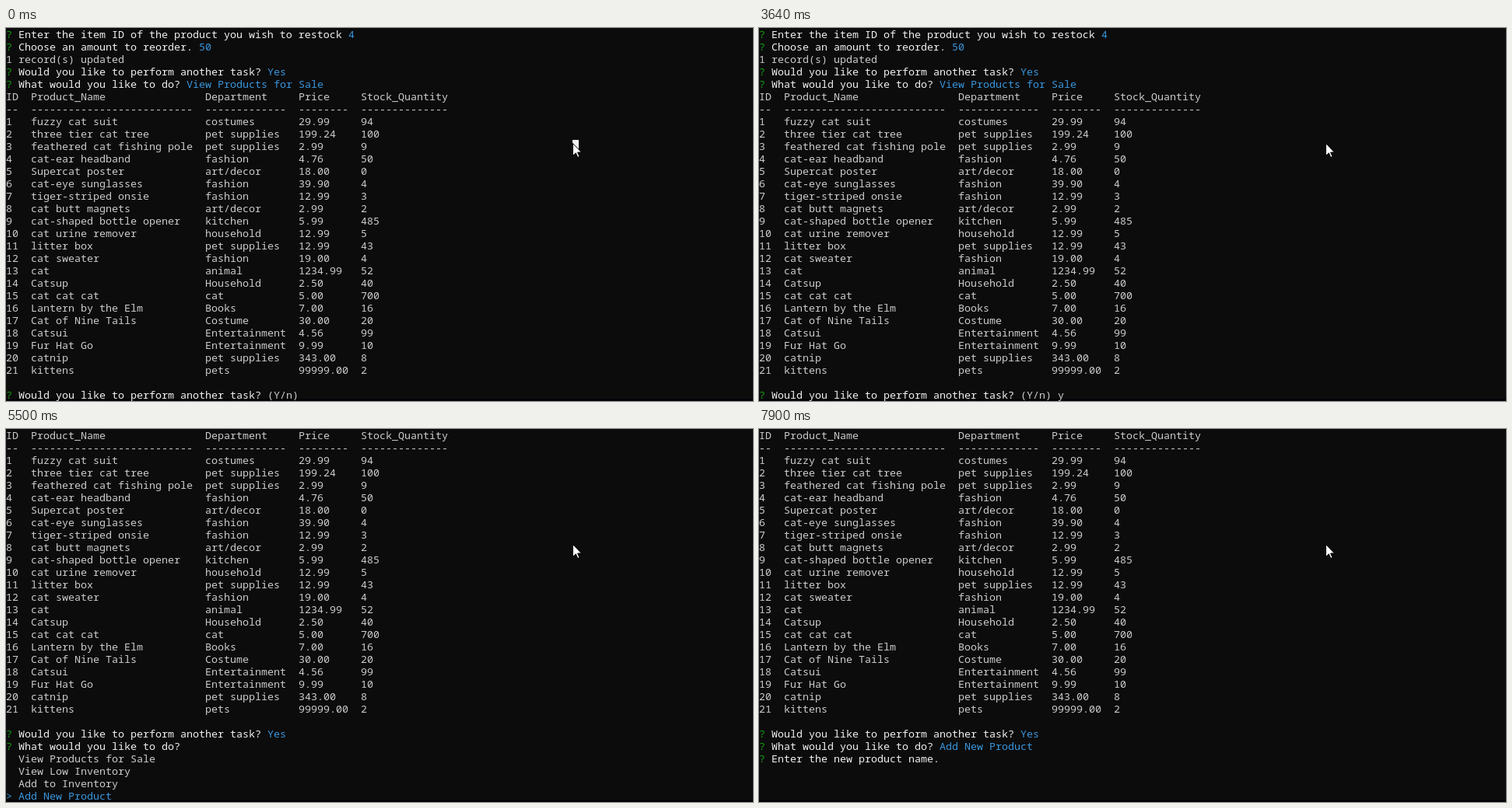
Recreate the animation shown at these times as an HTML page. Size 960 by 480 pixels, loop 8 s.

```html
<!DOCTYPE html>
<html lang="en">
<head>
<meta charset="utf-8">
<title>Inventory terminal</title>
<style>
  html, body { margin: 0; width: 100%; height: 100%; overflow: hidden; background: #0c0c0c; }
  svg { display: block; width: 960px; height: 480px; }
  text { font: 13.3333px "Noto Sans Mono", "DejaVu Sans Mono", monospace; white-space: pre; fill: #ccc; }
  .ask { fill: #f2f2f2; }
  .mark { fill: #13a10e; }
  .pick { fill: #3a96dd; }
  .block { fill: #f3f3f3; }
</style>
</head>
<body>
<svg viewBox="0 0 960 480">
  <rect width="960" height="480" fill="#0c0c0c"/>
  <rect y="477" width="960" height="3" fill="#050208"/>
  <g id="screen"></g>
  <rect id="selection" class="block" x="728" y="144" width="8" height="16"/>
  <rect id="caret" class="block" width="8" height="4"/>
  <path transform="translate(728 148)" d="M.5 .5V16.5L4.3 12.8L6.8 18.5L9 17.5L6.6 12H11.5Z" fill="#fff" stroke="#000"/>
</svg>
<script>
const CELL = 8, LINE = 16, BASELINE = 13, LOOP = 8000;
const COLUMNS = [0, 4, 32, 47, 57];
const WIDTHS = [2, 26, 13, 8, 14];

const PRODUCTS = `fuzzy cat suit|costumes|29.99|94
three tier cat tree|pet supplies|199.24|100
feathered cat fishing pole|pet supplies|2.99|9
cat-ear headband|fashion|4.76|50
Supercat poster|art/decor|18.00|0
cat-eye sunglasses|fashion|39.90|4
tiger-striped onsie|fashion|12.99|3
cat butt magnets|art/decor|2.99|2
cat-shaped bottle opener|kitchen|5.99|485
cat urine remover|household|12.99|5
litter box|pet supplies|12.99|43
cat sweater|fashion|19.00|4
cat|animal|1234.99|52
Catsup|Household|2.50|40
cat cat cat|cat|5.00|700
Lantern by the Elm|Books|7.00|16
Cat of Nine Tails|Costume|30.00|20
Catsui|Entertainment|4.56|99
Fur Hat Go|Entertainment|9.99|10
catnip|pet supplies|343.00|8
kittens|pets|99999.00|2`.split("\n").map((row, i) => [String(i + 1), ...row.split("|")]);

const MENU = ["View Products for Sale", "View Low Inventory", "Add to Inventory", "Add New Product"];
const AGAIN = "Would you like to perform another task?";
const WHAT = "What would you like to do?";

const put = (row, col, str, cls = "") =>
  `<text class="${cls}" x="${col * CELL}" y="${row * LINE + BASELINE}">${str.replace(/>/g, "&gt;")}</text>`;

const ask = (row, question, answer = "", cls = "pick") =>
  put(row, 0, "?", "mark") + put(row, 2, question, "ask") +
  (answer && put(row, question.length + 3, answer, cls));

const table = top => [
  ["ID", "Product_Name", "Department", "Price", "Stock_Quantity"],
  WIDTHS.map(n => "-".repeat(n)),
  ...PRODUCTS
].map((cells, i) => cells.map((s, c) => put(top + i, COLUMNS[c], s)).join("")).join("");

const listing = reply =>
  ask(0, "Enter the item ID of the product you wish to restock", "4") +
  ask(1, "Choose an amount to reorder.", "50") +
  put(2, 0, "1 record(s) updated") +
  ask(3, AGAIN, "Yes") +
  ask(4, WHAT, MENU[0]) +
  table(5) +
  ask(29, AGAIN, "(Y/n)" + reply, "");

const scrolled = () => table(0) + ask(24, AGAIN, "Yes");

const menu = (active, hint = "") =>
  scrolled() + ask(25, WHAT, hint, "") +
  MENU.map((item, i) => i === active
    ? put(26 + i, 0, "> " + item, "pick")
    : put(26 + i, 2, item)).join("");

const naming = () =>
  scrolled() + ask(25, WHAT, MENU[3]) + ask(26, "Enter the new product name.");

// start time, screen contents
const SCREENS = [
  [0, listing("")],
  [2440, listing(" y")],
  [3840, menu(0, "(Use arrow keys)")],
  [5100, menu(1)],
  [5300, menu(2)],
  [5500, menu(3)],
  [6370, naming()]
];

// on, off, column, row
const CARETS = [
  [500, 1040, 48, 29], [1570, 2100, 48, 29],
  [2440, 2640, 49, 29], [3100, 3640, 49, 29],
  [6370, 6840, 30, 26], [7370, 7900, 30, 26]
];

const [screenEl, selection, caret] =
  ["screen", "selection", "caret"].map(id => document.getElementById(id));
const show = (el, on) => el.setAttribute("visibility", on ? "visible" : "hidden");
let shown = null;

function draw(now) {
  const t = now % LOOP;
  const current = SCREENS.filter(([start]) => start <= t).pop();
  if (current !== shown) {
    shown = current;
    screenEl.innerHTML = current[1];
  }
  show(selection, t < 2440);
  const lit = CARETS.find(([on, off]) => t >= on && t < off);
  show(caret, lit);
  if (lit) {
    caret.setAttribute("x", lit[2] * CELL);
    caret.setAttribute("y", lit[3] * LINE + 12);
  }
}

const origin = performance.now();
function tick() {
  draw(performance.now() - origin);
  requestAnimationFrame(tick);
}
tick();
</script>
</body>
</html>
```
